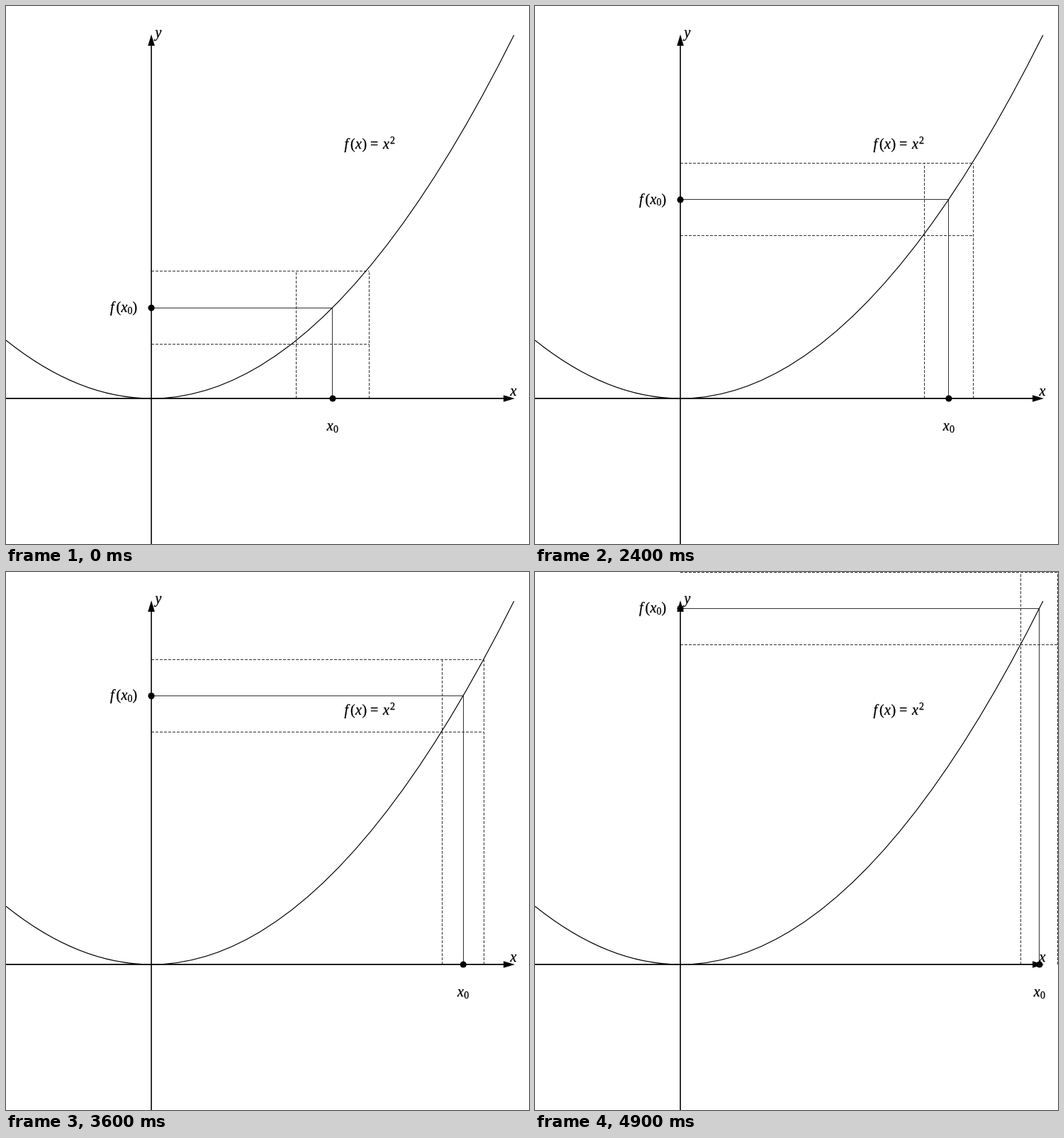
An HTML page with a canvas that plays this animation: 738 px wide and 758 px high, repeating every 5 s.

```html
<!DOCTYPE html>
<html>
<head>
<meta charset="utf-8">
<style>
html, body { margin: 0; height: 100%; overflow: hidden; background: #fff; }
canvas { display: block; }
</style>
</head>
<body>
<canvas id="stage" width="738" height="758"></canvas>
<script>
const ctx = document.getElementById('stage').getContext('2d');
const OX = 204.8, OY = 553;      // origin
const SCALE = 512;               // height = dx * dx / SCALE
const EPS = 51.2;                // half height of the dashed band
const STEP = 5.12, START = 256;
const STEPS = 50, STEP_MS = 100;

const f = dx => dx * dx / SCALE;
const snap = v => Math.floor(v) + 0.5;

function line(x1, y1, x2, y2) {
  ctx.beginPath();
  ctx.moveTo(x1, y1);
  ctx.lineTo(x2, y2);
  ctx.stroke();
}

function pen(color, width, dash = []) {
  ctx.strokeStyle = color;
  ctx.lineWidth = width;
  ctx.setLineDash(dash);
}

function dot(x, y) {
  ctx.beginPath();
  ctx.arc(x, y, 4.6, 0, 2 * Math.PI);
  ctx.fill();
}

function triangle(...p) {
  ctx.beginPath();
  for (let i = 0; i < 6; i += 2) ctx.lineTo(p[i], p[i + 1]);
  ctx.fill();
}

function glyph(text, x, y, size = 20, style = '') {
  ctx.font = `${style} ${size}px "Liberation Serif", "Times New Roman", serif`;
  ctx.fillText(text, x, y);
  ctx.strokeText(text, x, y);
}
const italic = (text, x, y) => glyph(text, x, y, 20, 'italic');

function drawAxes() {
  pen('#000', 1.6);
  line(0, 552.9, 704, 552.9);
  line(205.1, 54, 205.1, 758);
  triangle(718, 553, 702, 548.2, 702, 557.8);
  triangle(205.1, 40, 200.3, 56, 209.9, 56);

  // the parabola is exactly one quadratic Bézier segment
  const a = -OX, b = 512;
  pen('#000', 1.2);
  ctx.beginPath();
  ctx.moveTo(OX + a, OY - f(a));
  ctx.quadraticCurveTo(OX + (a + b) / 2, OY - a * b / SCALE, OX + b, OY - f(b));
  ctx.stroke();
}

function drawLabels(x, y) {
  pen('#000', 0.3);
  italic('x', 711.5, 549);
  italic('y', 210.5, 44);

  italic('f', 477.5, 201);
  glyph('(', 486, 201);
  italic('x', 493, 201);
  glyph(')', 502.5, 201);
  glyph('=', 514, 201);
  italic('x', 532, 201);
  glyph('2', 542, 194, 14);

  italic('f', 147, y + 6);
  glyph('(', 155.5, y + 6);
  italic('x', 162.5, y + 6);
  glyph('0', 171.5, y + 8.5, 14);
  glyph(')', 178.5, y + 6);

  italic('x', x - 8, 598);
  glyph('0', x + 1.2, 600.5, 14);
}

function draw(step) {
  const dx = START + step * STEP;
  const delta = EPS * SCALE / (2 * dx);   // band width follows the slope
  const x = OX + dx, y = OY - f(dx);
  const top = snap(y - EPS + 0.02), right = snap(x + delta);

  ctx.fillStyle = '#fff';
  ctx.fillRect(0, 0, 738, 758);
  ctx.fillStyle = '#000';

  pen('#333', 1, [4, 2]);
  for (const row of [top, snap(y + EPS)]) line(205, row, right, row);
  for (const col of [snap(x - delta), right]) line(col, OY, col, top);

  pen('#333', 1);
  line(205, snap(y), x, snap(y));
  line(snap(x), OY, snap(x), y);

  drawAxes();
  dot(205.1, y + 0.3);
  dot(x + 0.2, OY);
  drawLabels(x, y);
}

function tick() {
  draw(Math.floor(performance.now() / STEP_MS) % STEPS);
  requestAnimationFrame(tick);
}
tick();
</script>
</body>
</html>
```
